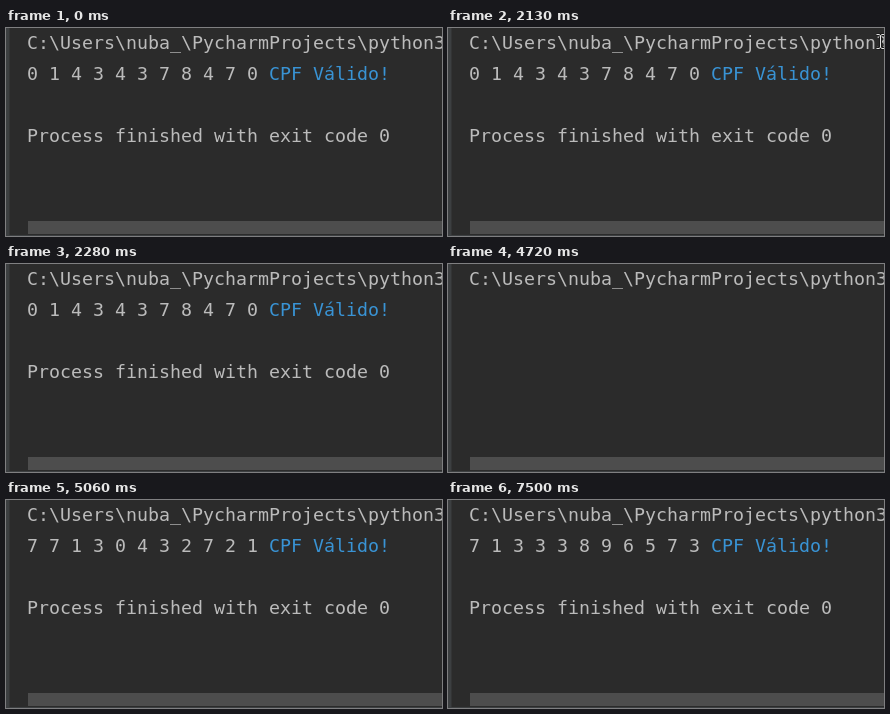
These frames come from a looping animation (436x208 px, 8000 ms). An HTML page:

```html
<!DOCTYPE html>
<html lang="en">
<head>
<meta charset="utf-8">
<title>Console output</title>
<style>
  html, body { margin: 0; width: 100%; height: 100%; overflow: hidden; background: #2b2b2b; }
  svg { display: block; }
  text {
    font: 18.27px "DejaVu Sans Mono", monospace;
    fill: #bbbbbb;
    font-variant-ligatures: none;
  }
  .blue { fill: #3993d4; }

  .output, .first, .second, .third, .pointer {
    animation: 8000ms step-end infinite;
  }
  .output { animation-name: output; }
  .first { animation-name: first; }
  .second { animation-name: second; }
  .third { animation-name: third; }
  .pointer { animation-name: pointer; }

  /* Console is cleared at 4720 and 7150 ms, refilled at 5060 and 7500 ms */
  @keyframes output {
    0%, 63.25%, 93.75% { opacity: 1; }
    59%, 89.375% { opacity: 0; }
    100% { opacity: 1; }
  }
  @keyframes first {
    0% { opacity: 1; }
    59%, 100% { opacity: 0; }
  }
  @keyframes second {
    0%, 89.375%, 100% { opacity: 0; }
    63.25% { opacity: 1; }
  }
  @keyframes third {
    0% { opacity: 0; }
    93.75%, 100% { opacity: 1; }
  }
  @keyframes pointer {
    0%, 27.625%, 100% { opacity: 0; }
    26.625% { opacity: 1; }
  }
</style>
</head>
<body>
<svg width="436" height="208" viewBox="0 0 436 208">
  <rect width="436" height="208" fill="#2b2b2b"/>
  <rect width="3.5" height="208" fill="#3c3f41"/>
  <rect x="22" y="193" width="414" height="13" fill="#4d4d4d"/>
  <rect y="207" width="436" height="1" fill="#3c3f41"/>

  <text x="21" y="21">C:\Users\nuba_\PycharmProjects\python3</text>
  <g class="output">
    <text class="first" x="21" y="52">0 1 4 3 4 3 7 8 4 7 0</text>
    <text class="second" x="21" y="52">7 7 1 3 0 4 3 2 7 2 1</text>
    <text class="third" x="21" y="52">7 1 3 3 3 8 9 6 5 7 3</text>
    <text class="blue" x="263" y="52">CPF Válido!</text>
    <text x="21" y="114">Process finished with exit code 0</text>
  </g>

  <g class="pointer" fill="none">
    <path id="beam" d="M428.5 6.5h2.5l1.5 1 1.5-1h2.5M432.5 7.5v12M428.5 20.5h2.5l1.5-1 1.5 1h2.5" stroke="#1c1c1c" stroke-width="3"/>
    <path d="M428.5 6.5h2.5l1.5 1 1.5-1h2.5M432.5 7.5v12M428.5 20.5h2.5l1.5-1 1.5 1h2.5" stroke="#e4e4e4"/>
  </g>
</svg>
</body>
</html>
```
